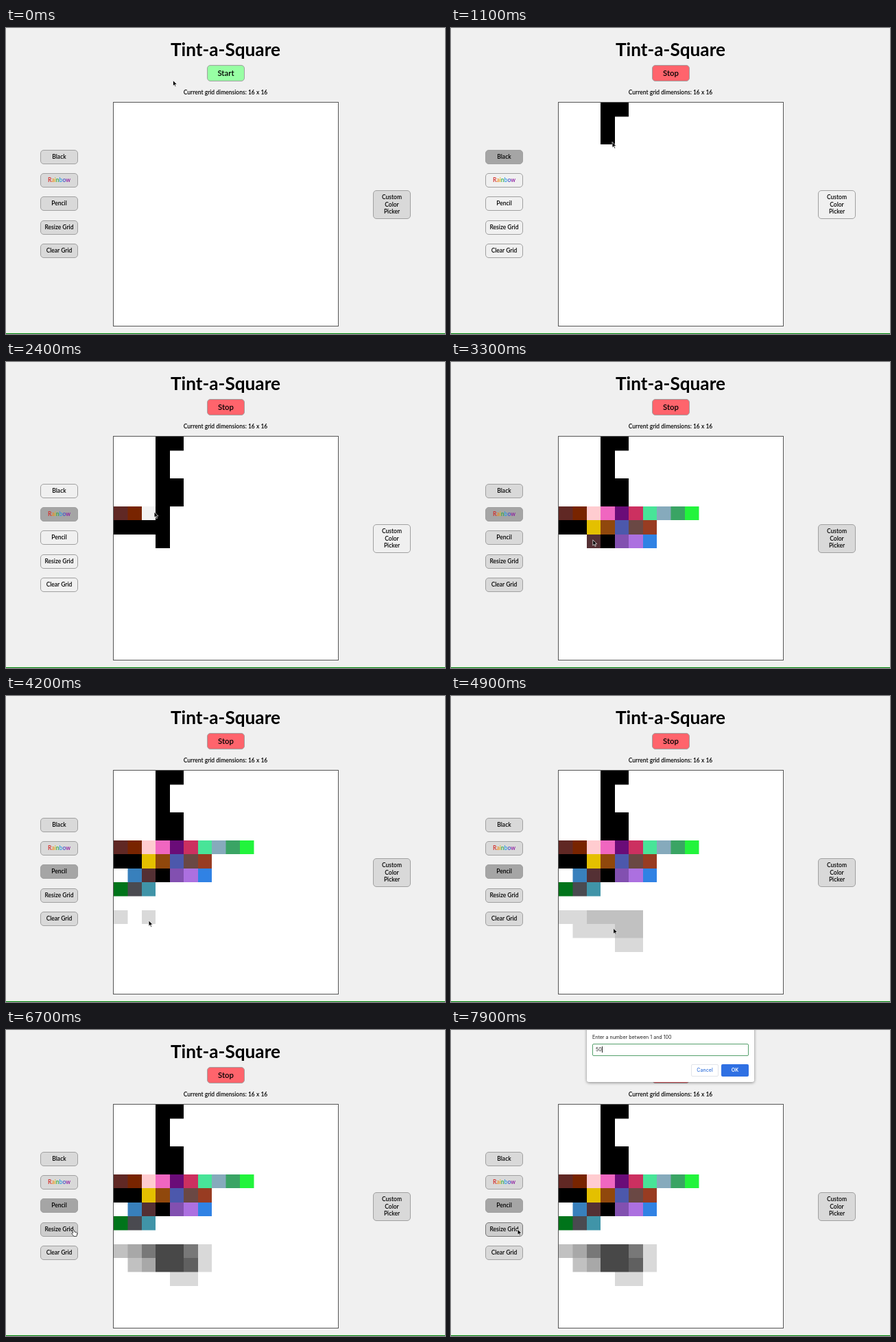
An HTML page with a canvas for the animation above (8 s loop, 640 by 447 pixels).

```html
<!DOCTYPE html>
<html lang="en">
<head>
<meta charset="utf-8">
<title>Tint-a-Square</title>
<style>
  html, body { margin: 0; width: 100%; height: 100%; overflow: hidden; background: #f0f0f0; }
  #stage { position: relative; width: 640px; height: 447px; overflow: hidden; background: #f0f0f0;
    color: #000; font: 600 8.5px/10.4px Lato, sans-serif; }
  #stage > *, #dialog > * { position: absolute; box-sizing: border-box; }
  h1, p { margin: 0; left: 0; width: 640px; text-align: center; white-space: nowrap; }
  h1 { top: 16px; font-size: 26.2px; line-height: 30px; font-weight: 700; }
  p { top: 89px; }
  .btn { left: 50px; width: 55px; height: 21px; border: 1px solid #a0a0a0; border-radius: 5px;
    display: flex; align-items: center; justify-content: center; text-align: center; }
  #power { left: 293px; top: 54px; height: 24px; font-size: 11.4px; }
  #picker { left: 535px; top: 237px; height: 42px; }
  canvas { left: 0; top: 0; width: 640px; height: 447px; }
  #frame { left: 156px; top: 108px; width: 329px; height: 328px; border: 1px solid #555; }
  #rule { left: 0; top: 445px; width: 640px; height: 2px; background: #007a10; border-top: 1px solid #d6f4d0; }
  #dialog { left: 198px; top: -8px; width: 244px; height: 84px; background: #fff; border-radius: 3px;
    box-shadow: 0 1px 4px rgba(0,0,0,.45); font: 400 7.1px/10px Inter, sans-serif; color: #222; }
  #ask { left: 8px; top: 14px; white-space: nowrap; }
  #field { left: 8px; top: 28px; width: 228px; height: 18px; border: 1.5px solid #55a06c; border-radius: 2px;
    padding: 3px 4px; display: flex; }
  #caret { width: 1px; height: 9px; background: #222; }
  .choice { top: 58px; width: 40px; height: 18px; border-radius: 2px; text-align: center;
    line-height: 17px; font-weight: 500; }
  #cancel { left: 152px; border: 1px solid #e2e5ea; color: #3574dc; line-height: 16px; }
  #ok { left: 196px; background: #2f70e3; color: #fff; font-weight: 600; }
  #cursor { left: 0; top: 0; width: 14px; height: 14px; overflow: visible; }
</style>
</head>
<body>
<div id="stage">
  <h1>Tint-a-Square</h1>
  <div class="btn" id="power">Start</div>
  <p>Current grid dimensions: 16 x 16</p>
  <canvas width="2560" height="1788"></canvas>
  <div id="frame"></div>
  <div class="btn tool" style="top:178px">Black</div>
  <div class="btn tool" style="top:212px" id="rainbow"></div>
  <div class="btn tool" style="top:246px">Pencil</div>
  <div class="btn tool" style="top:281px">Resize Grid</div>
  <div class="btn tool" style="top:315px">Clear Grid</div>
  <div class="btn tool" id="picker">Custom<br>Color<br>Picker</div>
  <div id="rule"></div>
  <div id="dialog">
    <div id="ask">Enter a number between 1 and 100</div>
    <div id="field"><span id="typed"></span><span id="caret"></span></div>
    <div class="choice" id="cancel">Cancel</div>
    <div class="choice" id="ok">OK</div>
  </div>
  <svg id="cursor">
    <path id="arrow" d="M0 0V8.2L1.9 6.5 3.2 9.5 4.5 9 3.2 6H5.9Z" fill="#000" stroke="#fff" stroke-width=".7"/>
    <path id="hand" d="M-1 0Q0-1 1 .2L2 3 5 3.6Q6 4 5.8 6L5 9.4H1L-2 5.6Q-2.4 4-.2 4.6Z"
      fill="#fff" stroke="#222" stroke-width=".8"/>
  </svg>
</div>
<script>
const LOOP = 8000, STEP = 100, SCALE = 4;
const START = 400, VIVID = 2800, ASK = 7000;
const GRID = { x: 157, y: 109, w: 327, h: 326, n: 16 };
const $ = id => document.getElementById(id);
const ctx = document.querySelector('canvas').getContext('2d');
const tools = [...document.querySelectorAll('.tool')];
const gridX = c => GRID.x + c * GRID.w / GRID.n;
const gridY = r => GRID.y + r * GRID.h / GRID.n;

// Capital letters paint the cell they enter, small ones only pass over it; S stays.
const strokes = [
  { tool: 'black', at: 908, dt: 64, cell: [4, 0], shift: [6.5, 6.5], moves: 'SLDDDRDLDDDULLL' },
  { tool: 'rainbow', at: 2312, dt: 44, cell: [0, 5], shift: [8, -2], moves: 'SRRRRRRRRRlllDDLULDULLDLrDLL' },
  { tool: 'pencil', at: 4050, dt: 75, cell: [0, 10], shift: [0, 5], moves: 'SrR' },
  { tool: 'pencil', at: 4200, dt: 40, cell: [2, 10], shift: [-2, -4],
    moves: 'sRRRDLLLLURRRRDDLULLLURRRRDLLLURRDLS' },
  { tool: 'pencil', at: 5600, dt: 34, cell: [3, 11], shift: [-2, -4], moves: 'sRRULLDRRRULLLDRRuLLLLL' }
];
const dirs = { S: [0, 0], R: [1, 0], L: [-1, 0], D: [0, 1], U: [0, -1] };

// Final rainbow colours by row, starting at column "from".
const rainbow = {
  5: { from: 0, hues: '602824 782400 ffccd0 f066c0 6a0c78 cc3060 48e498 86aabc 3aa464 22f43c'.split(' ') },
  6: { from: 2, hues: 'e4c000 90480c 4c58ac 6a4844 983c22'.split(' ') },
  7: { from: 1, hues: '3880bc 543034 000000 8250b0 ac70e0 3082e4'.split(' ') },
  8: { from: 0, hues: '00741a 4a4a50 4094a8'.split(' ') }
};

const track = [[0, 243.5, 76.5], [300, 318, 68], [450, 318, 68], [680, 78, 190], [750, 80, 190],
  [2000, 82, 225], [2150, 82, 225], [3680, 82, 260], [3820, 82, 260], [6650, 98, 292], [LOOP, 97, 291]];
const paints = [];
for (const { tool, at, dt, cell, shift, moves } of strokes) {
  let [c, r] = cell;
  [...moves].forEach((m, i) => {
    const up = m.toUpperCase(), t = at + i * dt;
    c += dirs[up][0];
    r += dirs[up][1];
    track.push([t, gridX(c + .5) + shift[0], gridY(r + .5) + shift[1]]);
    if (m === up) paints.push({ t, c, r, tool });
  });
}
track.sort((a, b) => a[0] - b[0]);

'#d42c28 #f08a1c #d8bc18 #30a848 #309ce0 #4850c8 #8c1ca0'.split(' ').forEach((color, i) => {
  const s = document.createElement('span');
  s.textContent = 'Rainbow'[i];
  s.style.color = color;
  $('rainbow').append(s);
});

function cursorAt(t) {
  const i = Math.max(1, track.findIndex(p => p[0] >= t));
  const [a, b] = [track[i - 1], track[i]];
  const k = b[0] > a[0] ? (t - a[0]) / (b[0] - a[0]) : 1;
  return [1, 2].map(n => a[n] + (b[n] - a[n]) * k);
}

// The canvas is larger than its box, so cell edges blend without seams.
function fillCells(c, r, cols, rows) {
  const px = v => Math.round(v * SCALE);
  const x = px(gridX(c)), y = px(gridY(r));
  ctx.fillRect(x, y, px(gridX(c + cols)) - x, px(gridY(r + rows)) - y);
}

function drawCells(t) {
  const levels = {};
  ctx.fillStyle = '#fff';
  fillCells(0, 0, GRID.n, GRID.n);
  for (const { t: when, c, r, tool } of paints) {
    if (when > t) continue;
    if (tool === 'black') ctx.fillStyle = '#000';
    else if (tool === 'rainbow') {
      const row = rainbow[r], hue = row.hues[c - row.from];
      ctx.fillStyle = t < VIVID && hue === 'ffccd0' ? '#f3f3f3' : '#' + hue;
    } else {
      const key = c + ',' + r, n = levels[key] = (levels[key] || 0) + 1;
      const v = 241 - 24.2 * n;
      ctx.fillStyle = `rgb(${v},${v},${v})`;
    }
    fillCells(c, r, 1, 1);
  }
}

function render(t) {
  const [x, y] = cursorAt(t);
  const on = t >= START, asking = t >= ASK;
  const over = b => x >= b.offsetLeft && x < b.offsetLeft + b.offsetWidth &&
    y >= b.offsetTop && y < b.offsetTop + b.offsetHeight;
  const active = t < 700 ? -1 : t < 2100 ? 0 : t < 3750 ? 1 : 2;
  const plain = on && t < VIVID ? '#f0f0f0' : '#d9d9d9';
  tools.forEach((b, i) => {
    b.style.background = i === active ? '#a5a5a5' : over(b) ? '#cdcdcd' : plain;
    b.style.borderColor = asking && over(b) ? '#777' : '#a0a0a0';
  });
  $('power').textContent = on ? 'Stop' : 'Start';
  $('power').style.background = on ? '#ff646c' : '#98ffa4';
  drawCells(t);

  $('dialog').style.display = asking ? 'block' : 'none';
  $('typed').textContent = t < 7500 ? '' : t < 7700 ? '5' : '50';

  const pointing = !asking && [...tools, $('power')].some(over);
  $('hand').style.display = pointing ? '' : 'none';
  $('arrow').style.display = pointing ? 'none' : '';
  $('cursor').style.transform = `translate(${x}px, ${y}px)`;
}

const began = performance.now();
function tick() {
  const t = (performance.now() - began) % LOOP;
  render(Math.floor(t / STEP) * STEP);
  requestAnimationFrame(tick);
}
tick();
</script>
</body>
</html>
```
